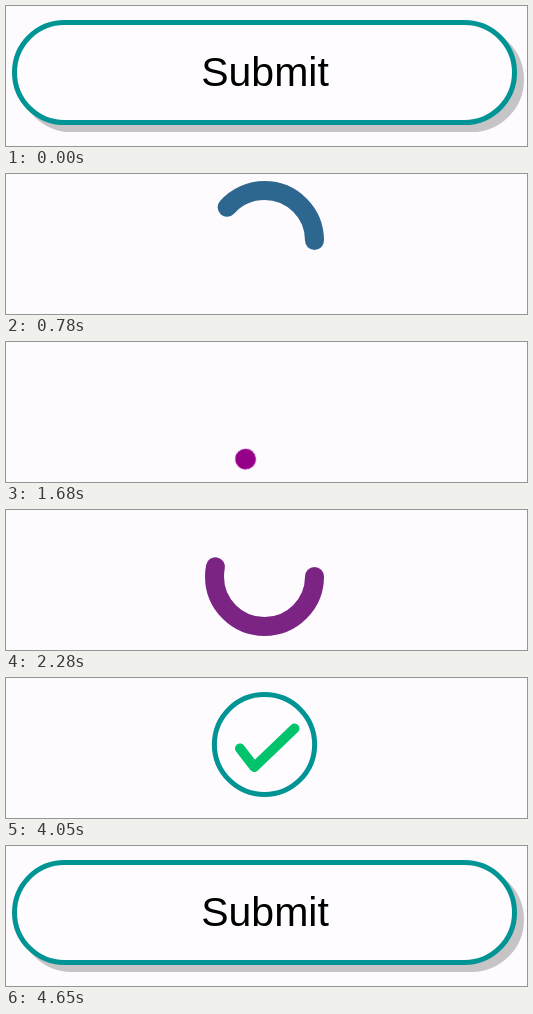
An HTML page for the animation above (6300 ms loop, 521 by 140 pixels).

```html
<!DOCTYPE html>
<html lang="en">
<head>
<meta charset="utf-8">
<title>Submit button</title>
<style>
  html, body { margin: 0; width: 100%; height: 100%; overflow: hidden; background: #fefbff; }
  svg { display: block; width: 521px; height: 140px; }
  svg * { animation: 6300ms linear infinite; }

  :root {
    --teal: #009494; --purple: #960088; --green: #00c36c;
    --smooth: cubic-bezier(.33, 0, .67, 1);
  }

  .pill { x: 8.5px; y: 16.5px; width: 500px; height: 100px; rx: 50px; stroke-width: 5px; }
  .face { fill: #fefcff; stroke: var(--teal); animation-name: morph, thicken, face; }
  .shadow { fill: #c6c4c6; stroke: #c6c4c6; animation-name: morph, thicken, shadow; }
  .label { font: 41px "Liberation Sans", Arial, sans-serif; text-anchor: middle; animation-name: label; }

  .loader { fill: none; color: var(--teal); animation-name: tint; }
  .ring { stroke: currentColor; stroke-width: 19px; stroke-linecap: round;
          stroke-dasharray: 360 720; animation-name: sweep, thin, ring; }
  .dot { fill: currentColor; transform-origin: 258.5px 70.5px; animation-name: orbit, dot; }
  .check { fill: none; stroke: var(--green); stroke-width: 10px; stroke-linecap: round;
           stroke-linejoin: round; stroke-dasharray: 1 2; animation-name: draw, check; }

  /* Button collapses to a circle, later opens again */
  @keyframes morph {
    0%, 2.381% { x: 8.5px; width: 500px; animation-timing-function: var(--smooth); }
    9.52%, 64.286% { x: 208.5px; width: 100px; animation-timing-function: var(--smooth); }
    73.8%, 100% { x: 8.5px; width: 500px; }
  }
  @keyframes thicken {
    0% { stroke-width: 5px; }
    9.52% { stroke-width: 19px; }
    9.53%, 100% { stroke-width: 5px; }
  }
  @keyframes face {
    0%, 9.52% { opacity: 1; }
    9.521%, 64.28% { opacity: 0; }
    64.281%, 100% { opacity: 1; }
  }
  @keyframes shadow {
    0%, 9.52% { opacity: 1; }
    9.521%, 64.286% { opacity: 0; }
    73.8%, 100% { opacity: 1; }
  }
  @keyframes label {
    0% { opacity: 1; }
    4.762%, 69.05% { opacity: 0; }
    73.8%, 100% { opacity: 1; }
  }

  /* Ring unwinds to a dot, the dot circles twice, the ring winds up again */
  @keyframes tint {
    0%, 9.524% { color: var(--teal); }
    19.05%, 33.65% { color: var(--purple); }
    47.62%, 100% { color: var(--green); }
  }
  @keyframes sweep {
    0%, 9.524% { stroke-dashoffset: 0; }
    14.19% { stroke-dashoffset: -360; }
    14.2%, 33.238% { stroke-dashoffset: 360; }
    38.825%, 100% { stroke-dashoffset: 0; }
  }
  @keyframes thin {
    0%, 38.095% { stroke-width: 19px; }
    47.62%, 100% { stroke-width: 5px; }
  }
  @keyframes ring {
    0%, 9.52% { opacity: 0; }
    9.521%, 14.19% { opacity: 1; }
    14.191%, 33.238% { opacity: 0; }
    33.239%, 64.28% { opacity: 1; }
    64.281%, 100% { opacity: 0; }
  }
  @keyframes orbit {
    0%, 14.19% { transform: rotate(0deg); }
    33.238%, 100% { transform: rotate(720deg); }
  }
  @keyframes dot {
    0%, 14.19% { opacity: 0; }
    14.191%, 33.238% { opacity: 1; }
    33.239%, 100% { opacity: 0; }
  }

  @keyframes draw {
    0%, 43.81% { stroke-dashoffset: 1; }
    49.99%, 100% { stroke-dashoffset: 0; }
  }
  @keyframes check {
    0%, 43.81% { opacity: 0; }
    43.811%, 64.286% { opacity: 1; }
    69.05%, 100% { opacity: 0; }
  }
</style>
</head>
<body>
<svg viewBox="0 0 521 140">
  <g transform="translate(7 7)"><rect class="pill shadow"/></g>
  <rect class="pill face"/>
  <text class="label" x="259" y="80">Submit</text>
  <g class="loader">
    <circle class="ring" cx="258.5" cy="66.5" r="50" pathLength="360"/>
    <circle class="dot" cx="308.8" cy="70.5" r="10.4"/>
  </g>
  <path class="check" d="M234 70.5 L248.3 89 L288.5 50.5" pathLength="1"/>
</svg>
</body>
</html>
```
